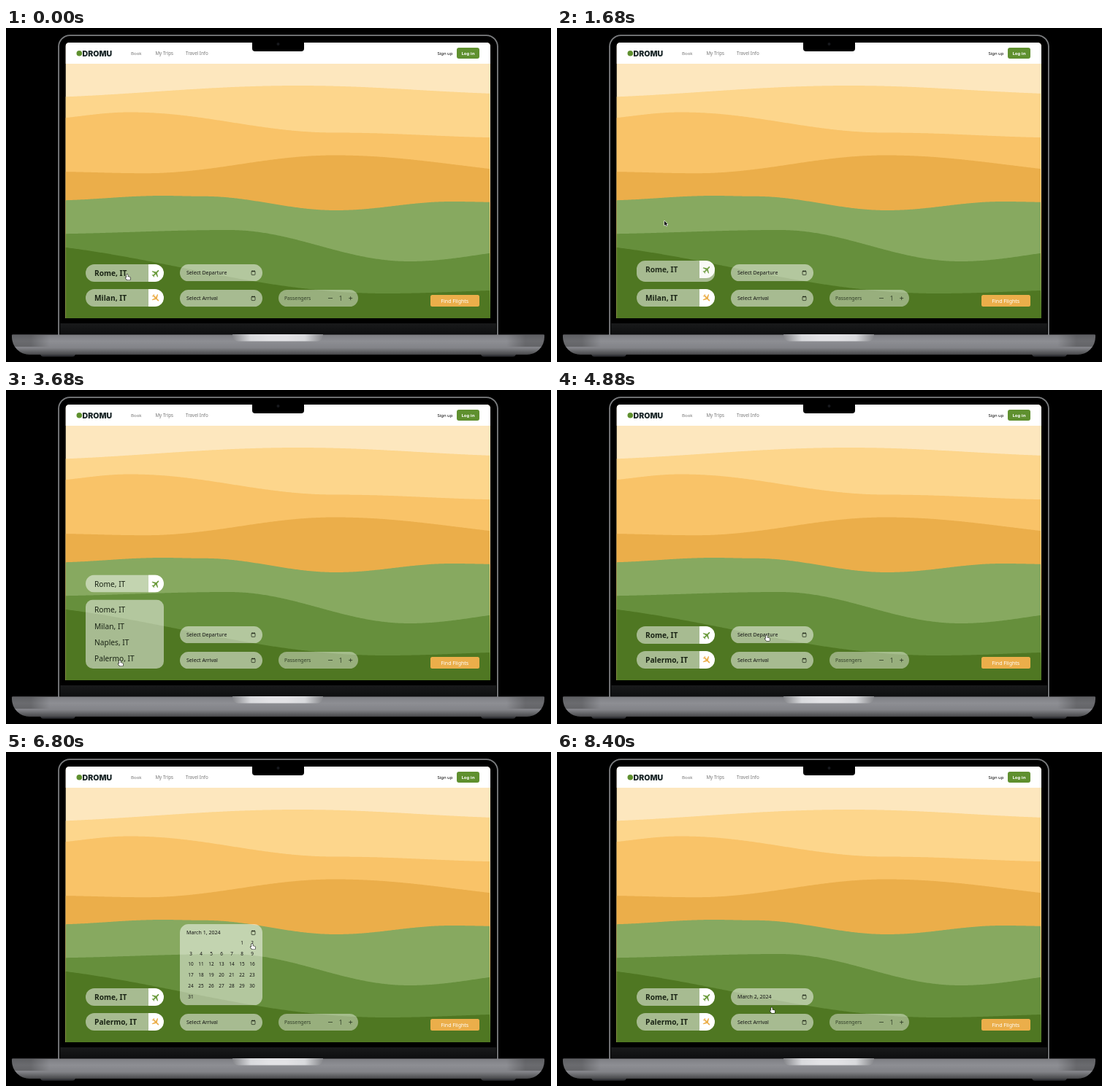
Animation, 746 px wide and 458 px high, one loop 8.48 s. Source, as an HTML page with a canvas:

```html
<!DOCTYPE html>
<html lang="en">
<head>
<meta charset="utf-8">
<title>Flight booking</title>
<style>
  html, body { margin: 0; width: 100%; height: 100%; overflow: hidden; background: #000; }
  canvas { display: block; width: 746px; height: 458px; }
</style>
</head>
<body>
<canvas id="stage"></canvas>
<script>
const W = 746, H = 458, LOOP = 8480, STEP = 80;
const canvas = document.getElementById('stage');
const dpr = window.devicePixelRatio || 1;
canvas.width = W * dpr;
canvas.height = H * dpr;
const g = canvas.getContext('2d');

const SANS = '"Noto Sans", "Open Sans", sans-serif';
const GLASS = 'rgba(255,255,255,0.5)';
const GREEN = '#5f902f', ORANGE = '#ebae4a', INK = '#1a2415';
const CITIES = ['Rome, IT', 'Milan, IT', 'Naples, IT', 'Palermo, IT'];
const SCREEN = { left: 81.5, top: 20, right: 663, bottom: 398 };
const ROW = 22.4, LIST_GROW = 70.5, CAL_GROW = 88;

// Crests and troughs of each band's upper edge, joined by cosine slopes.
const HILLS = [
  ['#fdd68c', [0, 96], [400, 79], [730, 91]],
  ['#f9c368', [30, 126.5], [170, 115.5], [450, 143.5], [700, 150.5]],
  ['#ebae4a', [60, 197], [190, 199.2], [450, 174.5], [790, 201.5]],
  ['#87a960', [60, 236.5], [215, 230], [270, 230.8], [452, 250], [610, 238], [700, 239.3]],
  ['#668f3c', [40, 282.5], [305, 277], [552, 320], [742, 302]],
  ['#4f7722', [-40, 293], [520, 364], [720, 359]]
];

// Pointer trips: leave, arrive, x, y
const HOME = [166, 338];
const TRIPS = [
  [640, 1200, 147, 264.5], [1760, 2400, 156, 371], [4160, 4720, 287, 336.5],
  [5600, 6400, 337, 263], [7600, 8400, 294, 350.5]
];

const plane = new Path2D('M21 16v-2l-8-5V3.5c0-.83-.67-1.5-1.5-1.5S10 2.67 10 3.5V9l-8 5v2l8-2.5V19l-2 1.5V22l3.5-1 3.5 1v-1.5L13 19v-5.5z');
const arrow = new Path2D('M0 0V7L1.7 5.6 2.9 8 4 7.5 3 5.1H5Z');
const hand = new Path2D('M-1 .6Q-1 -.3 -.1 -.3T.8 .6V3.2L3.6 3.8Q4.8 4.1 4.8 5.2L4.3 8.3H-.3L-2.8 5.1Q-2.9 4.1 -2 4.2L-1 5Z');

const clamp = v => Math.max(0, Math.min(1, v));
const lerp = (a, b, u) => a + (b - a) * u;
const easeOut = u => 1 - Math.pow(1 - clamp(u), 3);
const easeInOut = u => (1 - Math.cos(Math.PI * clamp(u))) / 2;

// 0 when shut, 1 when open
function openness(t, start, end) {
  return t < end ? easeOut((t - start) / 400) : 1 - easeOut((t - end) / 400);
}

function box(x, y, w, h, r, fill) {
  g.beginPath();
  g.roundRect(x, y, w, h, r);
  g.fillStyle = fill;
  g.fill();
}

function dot(x, y, r, fill) {
  g.beginPath();
  g.arc(x, y, r, 0, 2 * Math.PI);
  g.fillStyle = fill;
  g.fill();
}

function clipBox(x, y, w, h, r) {
  g.beginPath();
  g.roundRect(x, y, w, h, r);
  g.clip();
}

// Writes text with its capitals centred on y.
function text(str, x, y, size, color, weight = 400, align = 'left', font = SANS) {
  g.font = `${weight} ${size}px ${font}`;
  g.textAlign = align;
  g.fillStyle = color;
  g.fillText(str, x, y + size * 0.36);
}

function faded(alpha, draw) {
  if (alpha <= 0.01) return;
  g.save();
  g.globalAlpha *= alpha;
  draw();
  g.restore();
}

// Evenly spaced colours along a line.
function ramp(x0, y0, x1, y1, ...colors) {
  const grad = g.createLinearGradient(x0, y0, x1, y1);
  colors.forEach((c, i) => grad.addColorStop(i / (colors.length - 1), c));
  return grad;
}

function hill(color, ...keys) {
  const { left, right, bottom } = SCREEN;
  g.beginPath();
  g.moveTo(left, bottom);
  for (let x = left, i = 0; x <= right; x += 1.5) {
    while (x > keys[i + 1][0]) i++;
    const [ax, ay] = keys[i], [bx, by] = keys[i + 1];
    g.lineTo(x, lerp(ay, by, easeInOut((x - ax) / (bx - ax))));
  }
  g.lineTo(right, bottom);
  g.fillStyle = color;
  g.fill();
}

function laptop() {
  g.fillStyle = '#000';
  g.fillRect(0, 0, W, H);
  box(71.2, 9.2, 602.6, 412, [16, 16, 0, 0], '#7c7e80');
  box(73, 11, 599, 412, [14.5, 14.5, 0, 0], '#000');
  g.fillStyle = ramp(0, 405, 0, 420, '#191a1b', '#0e0f10');
  g.fillRect(74, 405, 597, 15);

  for (const x of [47, 650]) box(x, 446, 48, 4.5, [0, 0, 4, 4], '#35363a');
  g.beginPath();
  g.roundRect(8, 420.4, 729, 27.4, [1, 1, 24, 24]);
  g.fillStyle = '#8d8e93';
  g.fill();
  g.fillStyle = ramp(0, 420, 0, 448, 'rgba(0,0,0,.12)', 'rgba(0,0,0,0)', 'rgba(0,0,0,.08)', 'rgba(0,0,0,.5)');
  g.fill();
  for (const [from, to] of [[8, 60], [737, 685]]) {
    g.fillStyle = ramp(from, 0, to, 0, 'rgba(0,0,0,.25)', 'rgba(0,0,0,.25)', 'rgba(0,0,0,0)');
    g.fillRect(Math.min(from, to), 421, 52, 16);
  }
  box(310, 420, 124, 9.5, [0, 0, 8, 8],
    ramp(310, 0, 434, 0, '#85868a', '#d8d9dc', '#e2e2e5', '#e2e2e5', '#d8d9dc', '#85868a'));
}

function page() {
  const { left, top, right, bottom } = SCREEN;
  g.save();
  clipBox(left, top, right - left, bottom - top, [5, 5, 0, 0]);
  g.fillStyle = '#fde7be';
  g.fillRect(left, top, right - left, bottom - top);
  for (const band of HILLS) hill(...band);
  g.fillStyle = '#fff';
  g.fillRect(left, top, right - left, 29);
  g.restore();
  box(337, 18, 71, 14, [0, 0, 4, 4], '#000');
  dot(372.5, 22, 2, '#17191d');

  dot(100.3, 34.8, 3.8, GREEN);
  text('DROMU', 104.5, 34.8, 10.6, '#1e2a2c', 900, 'left', 'Inter, sans-serif');
  text('Book', 171, 35, 6.1, '#777');
  text('My Trips', 204.5, 35, 6.2, '#777');
  text('Travel Info', 246, 35, 6.2, '#777');
  text('Sign up', 590.5, 35, 5.9, '#000', 500);
  box(617, 27, 31, 15, 3, GREEN);
  text('Log in', 632.5, 35, 6, '#fff', 700, 'center');
}

function planeIcon(x, y, turn, color) {
  g.save();
  g.translate(x, y);
  g.rotate(turn);
  g.scale(0.57, 0.57);
  g.translate(-11.5, -12);
  g.fillStyle = color;
  g.fill(plane);
  g.restore();
}

// City field whose list grows upward from its bottom edge.
function cityField(bottom, open, picked, turn, color, lightness = 0) {
  const top = bottom - 24 - LIST_GROW * open;
  const itemY = i => top + 14 + ROW * i;
  g.save();
  clipBox(109, top, 107, bottom - top, 12 - 2 * open);
  g.fillStyle = GLASS;
  g.fillRect(109, top, 107, bottom - top);
  faded(1 - open, () => {
    box(195, top, 21, 24, [0, 12, 12, 0], '#fff');
    planeIcon(205, top + 12.3, turn, color);
  });
  CITIES.forEach((city, i) => {
    if (i !== picked) faded(open, () => text(city, 121, itemY(i), 10.2, INK, 500));
  });
  const y = lerp(bottom - 11.5, bottom - 10 - LIST_GROW + ROW * (picked - 0) - 0, open);
  const thin = Math.max(open, lightness);
  faded(1 - thin, () => text(CITIES[picked], 121, y, 10.2, INK, 700));
  faded(thin, () => text(CITIES[picked], 121, y, 10.2, INK, 500));
  g.restore();
}

function calendarIcon(x, y) {
  g.strokeStyle = g.fillStyle = '#1a2113';
  g.lineWidth = 0.7;
  g.beginPath();
  g.roundRect(x - 2.5, y - 2.4, 5, 5.2, 0.8);
  g.stroke();
  g.fillRect(x - 2.5, y - 2.6, 5, 1);
  for (const side of [-1.4, 1.4]) g.fillRect(x + side - 0.4, y - 3.4, 0.8, 1);
}

function dateField(top, label, open = 0, oldLabel = label) {
  const y = top - CAL_GROW * open, mid = y + 11.8, h = 23.3 + CAL_GROW * open;
  g.save();
  clipBox(238, y, 113, h, 11.6);
  g.fillStyle = GLASS;
  g.fillRect(238, y, 113, h);
  if (label === oldLabel) text(label, 247, mid, 7.05, '#111');
  else {
    faded(1 - open, () => text(oldLabel, 247, mid, 7.05, '#111'));
    faded(open, () => text(label, 247, mid, 7.05, '#111'));
  }
  calendarIcon(338.5, mid);
  faded(open, () => {
    for (let day = 1; day <= 31; day++) {
      const cell = day + 4;
      text(day, 253 + 14 * (cell % 7), y + 25.7 + 14.7 * Math.floor(cell / 7), 6.4, '#111', 400, 'center');
    }
  });
  g.restore();
}

function passengers() {
  box(373, 359, 109, 23, 11.5, GLASS);
  text('Passengers', 381, 371, 6.75, INK);
  text('1', 458, 370.8, 8.2, INK, 400, 'center');
  g.fillRect(441, 370.2, 6, 0.8);
  g.fillRect(469.2, 370.2, 5, 0.8);
  g.fillRect(471.3, 368.1, 0.8, 5);
}

function pointer(t, from, to, cal) {
  let [x, y] = HOME;
  for (const [leave, arrive, nx, ny] of TRIPS) {
    const u = easeInOut((t - leave) / (arrive - leave));
    x = lerp(x, nx, u);
    y = lerp(y, ny, u);
  }
  const inside = (l, top, r, bottom) => x > l && x < r && y > top && y < bottom;
  const lift = LIST_GROW * to;
  const over = inside(109, 324 - lift - LIST_GROW * from, 216, 348 - lift) ||
    inside(109, 358 - lift, 216, 382) ||
    inside(238, 324 - CAL_GROW * cal, 351, 351);
  g.save();
  g.translate(x, y);
  g.scale(0.9, 0.9);
  g.lineJoin = 'round';
  g.lineWidth = 1.2;
  g.strokeStyle = over ? '#111' : '#fff';
  g.fillStyle = over ? '#fff' : '#111';
  const shape = over ? hand : arrow;
  g.stroke(shape);
  g.fill(shape);
  g.restore();
}

function draw(t) {
  const from = openness(t, 320, 1445);
  const to = openness(t, 2608, 3760);
  const cal = openness(t, 5040, 7600);
  g.setTransform(dpr, 0, 0, dpr, 0, 0);
  laptop();
  page();
  cityField(348 - LIST_GROW * to, from, 0, Math.PI / 4, '#6a9a3c', to);
  cityField(382, to, t < 3760 ? 1 : 3, Math.PI * 3 / 4, ORANGE);

  const prompt = 'Select Departure';
  const date = t < 7120 ? 'March 1, 2024' : 'March 2, 2024';
  if (t < 5040) dateField(324, prompt);
  else dateField(324, date, cal, t < 7120 ? prompt : date);
  dateField(359, 'Select Arrival');
  faded(0.82, passengers);
  box(581, 366, 67, 16, 2.5, ORANGE);
  text('Find Flights', 614.3, 374.5, 7.05, '#fff', 400, 'center');
  pointer(t, from, to, cal);
}

const begin = performance.now();
function tick() {
  const t = (performance.now() - begin) % LOOP;
  draw(Math.floor(t / STEP) * STEP);
  requestAnimationFrame(tick);
}
tick();
</script>
</body>
</html>
```
